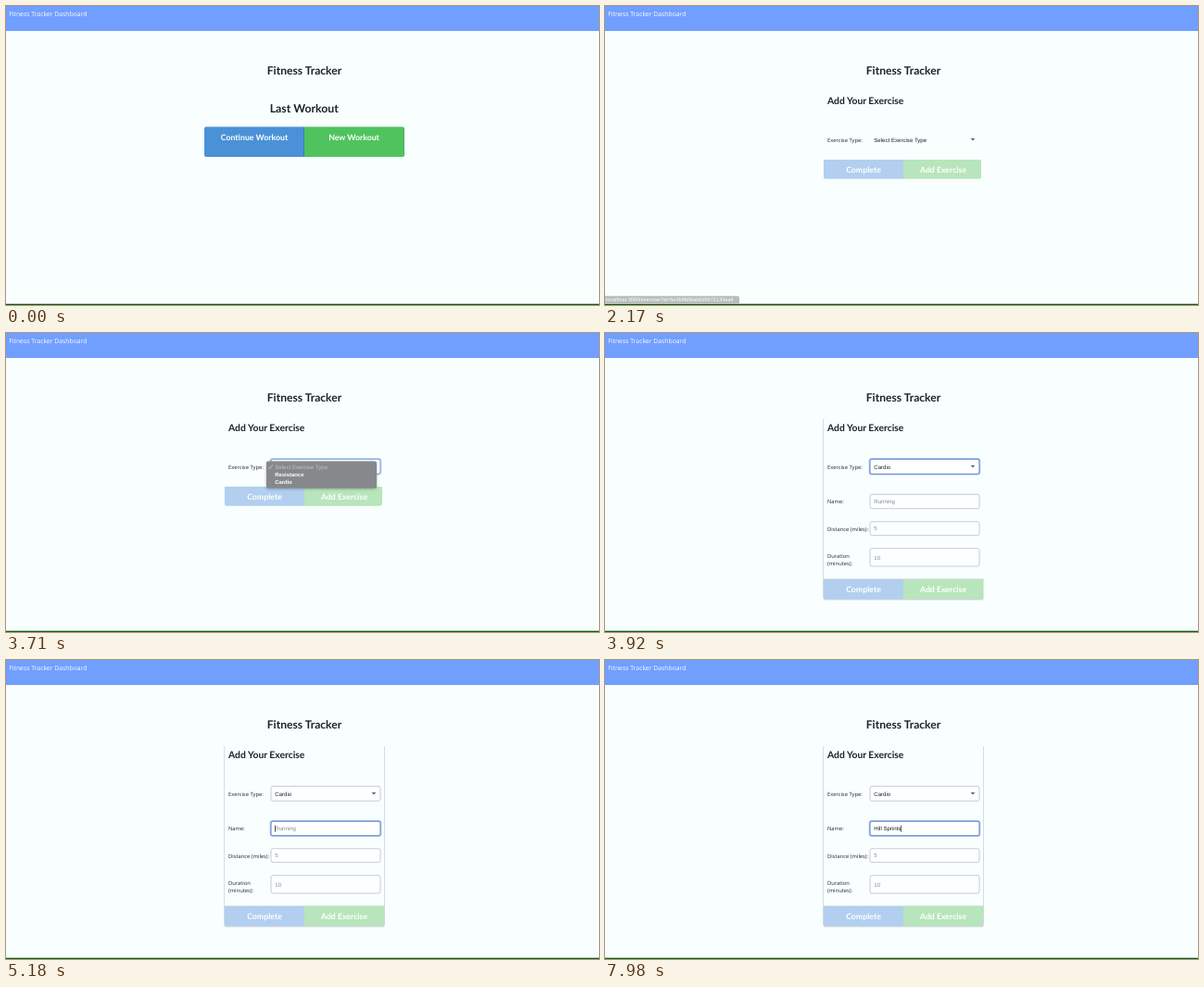
Animation, 640 px wide and 323 px high, one loop 8 s. Source, as an HTML page with a canvas:

```html
<!DOCTYPE html>
<html lang="en">
<head>
<meta charset="utf-8">
<title>Fitness Tracker</title>
<style>
  html, body { margin: 0; width: 100%; height: 100%; overflow: hidden; background: #f9feff; }
  canvas { display: block; width: 640px; height: 323px; }
</style>
</head>
<body>
<canvas id="stage"></canvas>
<script>
const W = 640, H = 323, LOOP = 8000;
const LATO = 'Lato, sans-serif';
const OPEN = '"Open Sans", "Noto Sans", sans-serif';
const ARIAL = '"Liberation Sans", Arial, sans-serif';

// Moments of the story, in ms
const PRESS = 1750, FORM = 1960, STATUS_OFF = 2310, MENU = 3220, CHOOSE = 3640,
      CARDIO = 3780, NAME = 5110, TYPE = 6440, KEY = 86, BLINK = 500;
const TYPED = 'Hill Sprints';

const canvas = document.getElementById('stage');
const ctx = canvas.getContext('2d');
const dpr = window.devicePixelRatio || 1;
canvas.width = W * dpr;
canvas.height = H * dpr;

const ramp = (t, a, b) => Math.min(1, Math.max(0, (t - a) / (b - a)));
const mix = (a, b, k) => `rgb(${a.map((v, i) => Math.round(v + (b[i] - v) * k))})`;

function text(str, x, y, font, color, align = 'left') {
  ctx.font = font;
  ctx.fillStyle = color;
  ctx.textAlign = align;
  ctx.fillText(str, x, y);
}

function rect(x, y, w, h, color) {
  ctx.fillStyle = color;
  ctx.fillRect(x, y, w, h);
}

function box(x, y, w, h, r, fill, stroke, line = 1) {
  ctx.beginPath();
  ctx.roundRect(x, y, w, h, r);
  if (fill) { ctx.fillStyle = fill; ctx.fill(); }
  if (stroke) { ctx.strokeStyle = stroke; ctx.lineWidth = line; ctx.stroke(); }
}

function faded(alpha, draw) {
  if (alpha <= 0) return;
  ctx.save();
  ctx.globalAlpha = alpha;
  draw();
  ctx.restore();
}

const title = (str, x, y, size, align) => text(str, x, y, `bold ${size}px ${LATO}`, '#1f2327', align);
const label = (str, y) => text(str, 240, y, `5.8px ${OPEN}`, '#25282b');
const value = (str, y, color) => text(str, 290.3, y, `6.1px ${ARIAL}`, color);
const caption = (str, x, y) => text(str, x, y, `bold 8.75px ${LATO}`, '#fff', 'center');

function page() {
  rect(0, 0, W, H, '#f9feff');
  rect(0, 0, W, 27, '#719fff');
  text('Fitness Tracker Dashboard', 3.2, 10.7, `6.85px ${OPEN}`, '#fff');
  title('Fitness Tracker', 322, 74, 12.1, 'center');
  rect(0, 321, W, 1, '#b9d6b9');
  rect(0, 322, W, 1, '#0d5c10');
}

function dashboard(t) {
  title('Last Workout', 321.8, 114.6, 12.3, 'center');
  const k = ramp(t, PRESS, PRESS + 140);
  box(214, 130.5, 108, 32.5, [2, 0, 0, 2], mix([74, 145, 216], [64, 131, 196], k));
  box(322, 130.5, 108, 32.5, [0, 2, 2, 0], '#4fc45e');
  rect(321, 130.5, 1, 32.5, 'rgba(30,80,120,.3)');
  rect(429, 132, 1, 30, 'rgba(90,110,95,.3)');
  caption('Continue Workout', 268, 145.3);
  caption('New Workout', 375.5, 145.3);
}

function field(y, h, focused, alpha = 1) {
  faded(alpha, () => {
    if (focused) {
      box(285.5, y - .5, 119, h + 1, 2.5, '#fff', '#a9c0ea', 1.6);
      box(286, y, 118, h, 2, null, '#6b8fd0', 1);
    } else {
      box(286, y, 118, h, 2, '#fcffff', '#c3c7cb', .9);
    }
  });
}

function buttons(y, h, right) {
  box(236, y, 86, h, [0, 0, 0, 2], '#b2cff0');
  box(322, y, right - 322, h, [0, 0, 2, 0], '#b8e5bb');
  caption('Complete', 279, y + 14.2);
  caption('Add Exercise', 365, y + 14.2);
}

function menu() {
  ctx.save();
  ctx.shadowColor = 'rgba(0,0,0,.3)';
  ctx.shadowBlur = 3 * dpr;
  ctx.shadowOffsetY = dpr;
  box(281, 138.5, 119, 29, 2, '#86888b');
  ctx.restore();
  ctx.beginPath();
  ctx.moveTo(283.6, 144.8);
  ctx.lineTo(285, 146.5);
  ctx.lineTo(287.6, 142.4);
  ctx.strokeStyle = '#c9cbcd';
  ctx.lineWidth = .8;
  ctx.stroke();
  value('Select Exercise Type', 146.6, '#c2c4c6');
  text('Resistance', 290.3, 154.6, `bold 5.9px ${ARIAL}`, '#fff');
  text('Cardio', 290.3, 162.6, `bold 5.9px ${ARIAL}`, '#fff');
}

function nameField(t) {
  const focused = t >= NAME;
  field(174.3, 15.4, focused);
  const count = t < TYPE ? 0 : Math.min(TYPED.length, Math.floor((t - TYPE) / KEY) + 1);
  const typed = TYPED.slice(0, count);
  if (count) value(typed, 184.2, '#17191b');
  else value('Running', 184.2, '#868a8e');
  if (!focused) return;
  // The caret stays lit while keys are pressed
  const since = count ? t - (TYPE + (count - 1) * KEY) : t - NAME;
  const lit = count ? since < 600 : Math.floor(since / BLINK) % 2 === 0;
  if (!lit) return;
  ctx.font = `6.1px ${ARIAL}`;
  rect(290.2 + ctx.measureText(typed).width, 178.6, .7, 7.2, '#17191b');
}

function card(t) {
  const side = '#d3d8dc';
  rect(235.2, 93, .9, 193, side);
  faded(ramp(t, 4270, 4550), () => rect(408, 93, .9, 193, side));
  box(235.6, 265.5, 173, 23, [0, 0, 2, 2], '#cdd3d8');
  buttons(266, 21.5, 408);
}

function exercise(t) {
  const cardio = t >= CARDIO;
  if (cardio) card(t);
  else buttons(166, 20.7, 406);

  title('Add Your Exercise', 240, 106.2, 10.35);
  label('Exercise Type:', 146.8);
  const picked = t >= 3570;
  if (picked) field(136.3, 15.9, t < NAME, cardio ? 1 : .75);
  value(cardio ? 'Cardio' : 'Select Exercise Type', 146.6, '#1d2022');
  ctx.beginPath();
  ctx.moveTo(394.7, 143);
  ctx.lineTo(399.3, 143);
  ctx.lineTo(397, 145.6);
  ctx.fillStyle = '#5d6266';
  ctx.fill();

  if (cardio) {
    label('Name:', 184.4);
    nameField(t);
    label('Distance (miles):', 213.6);
    field(203.8, 14.8);
    value('5', 213.2, '#868a8e');
    label('Duration', 242.5);
    label('(minutes):', 250.6);
    field(232.7, 19.3);
    value('10', 244.6, '#868a8e');
  }
  if (t >= MENU) faded(ramp(t, MENU - 70, MENU) * (1 - ramp(t, CHOOSE + 90, CARDIO + 70)), menu);

  faded(1 - ramp(t, STATUS_OFF - 100, STATUS_OFF + 70), () => {
    box(0, 313.3, 145, 8.2, [0, 2, 0, 0], '#b9bcbd');
    text('localhost:3000/exercise?id=5e3b9b0bab6d5b72134aa4', 1, 319.4, `5.6px ${ARIAL}`, '#fff');
  });
}

function draw(t) {
  ctx.setTransform(dpr, 0, 0, dpr, 0, 0);
  ctx.textRendering = 'geometricPrecision';
  page();
  if (t < FORM) dashboard(t);
  else exercise(t);
}

let start;
function tick(now) {
  start ??= now;
  draw((now - start) % LOOP);
  requestAnimationFrame(tick);
}
draw(0);
requestAnimationFrame(tick);
</script>
</body>
</html>
```
